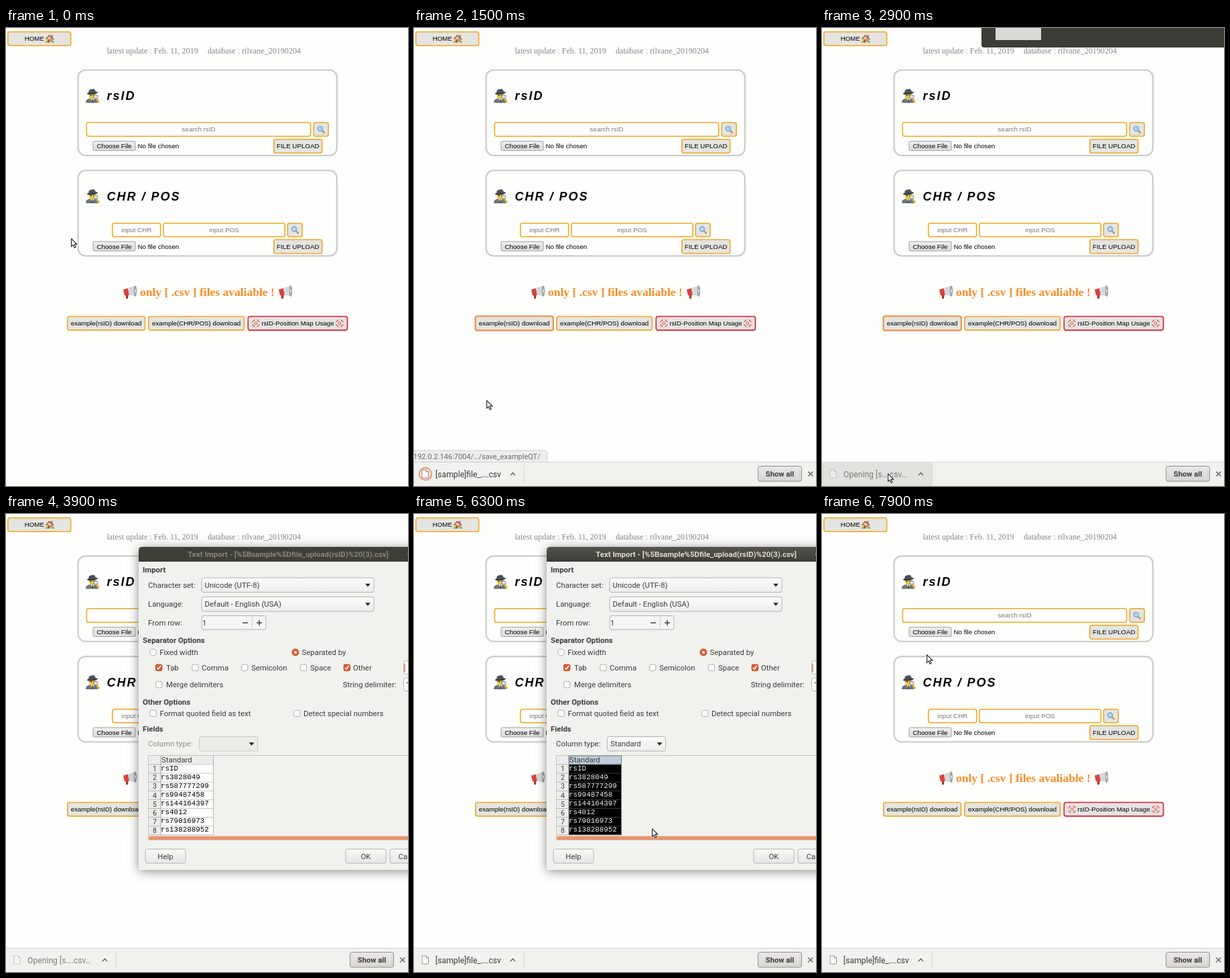
An HTML page with a canvas that plays this animation: 600 by 682 pixels, repeating every 8 s.

```html
<!DOCTYPE html>
<html lang="en">
<head>
<meta charset="utf-8">
<title>File download and text import</title>
<style>
html, body { margin: 0; width: 100%; height: 100%; overflow: hidden; background: #fefefd; }
canvas { display: block; }
</style>
</head>
<body>
<canvas id="stage" width="600" height="682"></canvas>
<script>
const LOOP = 8000, STEP = 100, TAU = Math.PI * 2;
const ORANGE = '#f5a623', FACE = '#e4e4e2', PANEL = '#f1f1ee', INK = '#3c3c3c';
const ARIAL = '9.75px "Liberation Sans", sans-serif';
const UI = '11.4px Roboto, sans-serif', UI_BOLD = 'bold ' + UI;
const MONO = '10.9px "Liberation Mono", monospace';

const main = document.getElementById('stage').getContext('2d');
const layer = document.createElement('canvas');
layer.width = 660;
layer.height = 682;
const layerCtx = layer.getContext('2d');
let g = main;

// ---- helpers ----
function text(s, x, y, font, color = '#000', align = 'left') {
  g.font = font;
  g.fillStyle = color;
  g.textAlign = align;
  g.fillText(s, x, y);
}

// Rounded box given by its outer edges.
function box(x0, y0, x1, y1, fill, stroke, line = 1, r = 3) {
  const h = stroke ? line / 2 : 0;
  g.beginPath();
  g.roundRect(x0 + h, y0 + h, x1 - x0 - 2 * h, y1 - y0 - 2 * h, r);
  if (fill) { g.fillStyle = fill; g.fill(); }
  if (stroke) { g.strokeStyle = stroke; g.lineWidth = line; g.stroke(); }
}

function rect(x, y, w, h, fill) {
  g.fillStyle = fill;
  g.fillRect(x, y, w, h);
}

function poly(points, fill) {
  g.beginPath();
  points.forEach(([x, y]) => g.lineTo(x, y));
  g.closePath();
  g.fillStyle = fill;
  g.fill();
}

function line(points, color, width = 1) {
  g.beginPath();
  points.forEach(([x, y], i) => i ? g.lineTo(x, y) : g.moveTo(x, y));
  g.strokeStyle = color;
  g.lineWidth = width;
  g.stroke();
}

function disc(x, y, rx, fill, stroke, width = 1, ry = rx) {
  g.beginPath();
  g.ellipse(x, y, rx, ry, 0, 0, TAU);
  if (fill) { g.fillStyle = fill; g.fill(); }
  if (stroke) { g.strokeStyle = stroke; g.lineWidth = width; g.stroke(); }
}

function shade(y0, y1, top, bottom) {
  const s = g.createLinearGradient(0, y0, 0, y1);
  s.addColorStop(0, top);
  s.addColorStop(1, bottom);
  return s;
}

function at(x, y, draw) {
  g.save();
  g.translate(x, y);
  draw();
  g.restore();
}

// ---- pictograms, centred on 0,0 ----
function house() {
  rect(-4.5, -1, 9, 6.5, '#e8b27a');
  rect(2, -5.5, 2, 4, '#a1543a');
  poly([[-6.5, 0], [-1, -6], [6.5, 0], [5, 1.5], [-1, -3.5], [-5.5, 1.5]], '#a86a45');
  rect(-3, 1.5, 2.6, 4, '#8d4a32');
  rect(1, 1, 2.5, 2.5, '#6d93b5');
  disc(-5, 4.6, 1.6, '#8fae4f');
  disc(5, 4.6, 1.5, '#8fae4f');
}

function detective() {
  poly([[-10.5, 10.5], [-9.5, 6], [-4, 3.5], [3, 3.5], [7, 6], [8, 10.5]], '#6c757b');
  poly([[-4, 3.5], [-0.5, 9], [3, 3.5]], '#e9e9e9');
  poly([[-1, 4.5], [-1.8, 10], [1, 10], [0, 4.5]], '#4a545b');
  disc(-0.5, -1, 5.4, '#f7c33c', null, 1, 6);
  rect(-3.6, -1.5, 1.8, 1.6, '#40322a');
  rect(1, -1.5, 1.8, 1.6, '#40322a');
  g.save();
  g.rotate(-0.12);
  disc(0, -4.2, 8.2, '#353d43', null, 1, 2.1);
  poly([[-5.8, -4.5], [-4.8, -9], [-1, -10.3], [3.5, -9.8], [5.8, -4.5]], '#4a545b');
  g.restore();
  line([[6, 4.5], [9.5, 9.5]], '#f0b52e', 3);
  disc(4.5, 1.5, 3, '#d5e6ea', '#7b868c', 1);
}

function glass() {
  line([[1, 1], [5, 5]], '#c9853f', 2.2);
  disc(-1.5, -1.5, 3.6, '#a9d8f2', '#6d9fc4', 1.2);
}

function megaphone() {
  poly([[-10, -4], [-3, -6], [-1, 4], [-8, 5]], '#d9433a');
  poly([[-6, 4], [-2.5, 3.5], [-3, 9.5], [-6, 9.5]], '#b8332e');
  poly([[-3, -6], [7.5, -10], [9.5, 6.5], [-1, 4]], '#d6d8d9');
  disc(8, -1.8, 2.2, '#9aa0a3', null, 1, 8.3);
  disc(8, -1.8, 1, '#e5e6e7', null, 1, 3);
}

function anger() {
  for (let i = 0; i < 4; i++) {
    g.rotate(Math.PI / 2);
    g.beginPath();
    g.moveTo(1.6, -5.6);
    g.quadraticCurveTo(3.2, -3.2, 5.6, -1.6);
    g.moveTo(-1.4, -1.8);
    g.quadraticCurveTo(0, -1.2, 1.4, -1.8);
    g.moveTo(3, -5.4);
    g.quadraticCurveTo(2.2, -2.2, 5.4, -3);
    g.strokeStyle = '#e2544c';
    g.lineWidth = 1;
    g.stroke();
  }
}

// ---- web page ----
function pageButton(x0, y0, x1, y1, label = '', border = ORANGE) {
  box(x0, y0, x1, y1, FACE, border, 1.6);
  text(label, (x0 + x1) / 2, (y0 + y1) / 2 + 3.3, ARIAL, '#000', 'center');
}

function pageInput(x0, y0, x1, y1, hint) {
  box(x0, y0, x1, y1, '#fff', ORANGE, 1.6);
  text(hint, (x0 + x1) / 2, (y0 + y1) / 2 + 3.2, ARIAL, '#757575', 'center');
}

function searchPanel(y, title) {
  box(106.5, y, 495, y + 129.5, null, '#cdcdcb', 2.3, 11);
  at(129.5, y + 39.5, detective);
  g.letterSpacing = '2px';
  text(title, 150.5, y + 45.5, 'italic bold 18px "Liberation Sans", sans-serif');
  g.letterSpacing = '0px';
  box(129.5, y + 106.5, 193.5, y + 121.5, shade(y + 106, y + 122, '#f0f0ee', '#dadad8'), '#a2a2a0', 1, 1.5);
  text('Choose File', 161.5, y + 117.5, ARIAL, '#000', 'center');
  text('No file chosen', 196.5, y + 117.5, ARIAL);
  pageButton(399, y + 103.5, 472.5, y + 125.5, 'FILE UPLOAD');
}

function page(focused) {
  rect(0, 0, 600, 682, '#fefefd');
  pageButton(2, 5, 97.5, 27);
  text('HOME', 27.7, 19.3, ARIAL);
  at(65.5, 16, house);
  const serif = '12.1px "Liberation Serif", serif';
  text('latest update : Feb. 11, 2019', 150.5, 38, serif, '#808886');
  text('database : rilvane_20190204', 301, 38, serif, '#808886');

  searchPanel(61.5, 'rsID');
  pageInput(119.5, 140, 455.5, 162, 'search rsID');
  pageButton(458.5, 140, 482, 162);
  at(470.5, 151.5, glass);

  searchPanel(211, 'CHR / POS');
  pageInput(158, 290, 231.5, 311.5, 'input CHR');
  pageInput(234, 290, 417, 311.5, 'input POS');
  pageButton(419.5, 290, 443, 311.5);
  at(431.5, 301, glass);

  at(185, 393.5, megaphone);
  text('only [ .csv ] files avaliable !', 200, 399.3, 'bold 17.5px "Liberation Serif", serif', '#fb8b24');
  at(417, 393.5, megaphone);

  pageButton(91, 428.7, 208.3, 450.7, 'example(rsID) download');
  if (focused) box(90.3, 428, 209, 451.4, null, '#f0965c', 2);
  pageButton(212, 428.7, 356.3, 450.7, 'example(CHR/POS) download');
  pageButton(360.5, 428.7, 510.3, 450.7, 'rsID-Position Map Usage', '#dc1a2c');
  at(373, 439.7, anger);
  at(498, 439.7, anger);
}

// ---- browser chrome ----
function statusBubble(bottom) {
  g.beginPath();
  g.roundRect(-2, bottom - 17, 200.5, 20, [0, 4, 0, 0]);
  g.fillStyle = '#ededeb';
  g.fill();
  g.strokeStyle = '#cfcfcc';
  g.lineWidth = 1;
  g.stroke();
  text('192.0.2.146:7004/…/save_exampleQT/', -1, bottom - 4, '11px Roboto, sans-serif', '#6a6a68');
}

function downloadBar(top, { opening, hover, ring }) {
  g.save();
  g.translate(0, top - 646);
  rect(0, 646, 600, 36, PANEL);
  if (hover) rect(0, 647, 164, 35, '#e1e1de');
  rect(0, 646, 600, 1, '#d3d3d0');
  rect(164, 651, 1, 27, '#d3d3d0');

  if (ring) disc(17, 664, 9.3, '#f8dfd5', '#e9835f', 1.5);
  g.globalAlpha = opening ? 0.4 : 1;
  poly([[12, 658], [18.5, 658], [21.5, 661], [21.5, 670], [12, 670]], '#fbfbfa');
  line([[12, 658], [18.5, 658], [21.5, 661], [21.5, 670], [12, 670], [12, 657.5]], '#94928e');
  line([[18.5, 658], [18.5, 661], [21.5, 661]], '#94928e');
  g.globalAlpha = 1;
  text(opening ? 'Opening [s….csv…' : '[sample]file_….csv', 32, 668.8,
    '12.2px Roboto, sans-serif', opening ? '#7d7d7a' : INK);
  line([[144, 666], [147.5, 662.5], [151, 666]], '#555', 1.3);

  box(513, 652, 579, 675.5, shade(652, 675, '#e9e8e6', '#d6d5d2'), '#93918e', 1, 3);
  text('Show all', 546, 667.7, 'bold 11.2px Roboto, sans-serif', INK, 'center');
  line([[588.5, 660.5], [595.5, 667.5]], '#666', 1.5);
  line([[595.5, 660.5], [588.5, 667.5]], '#666', 1.5);
  g.restore();
}

function splash() {
  box(238, -10, 610, 29, '#3d3c37', null, 0, 4);
  rect(259, 0, 68, 18, '#d9dbd9');
}

// ---- import dialog ----
function combo(x0, y0, x1, y1, label, enabled = true) {
  box(x0, y0, x1, y1, enabled ? shade(y0, y1, '#fcfcfb', '#ececea') : '#ebebe8', enabled ? '#b3b2ae' : '#c9c8c4');
  text(label, x0 + 5, (y0 + y1) / 2 + 4, UI, INK);
  const x = x1 - 9.5, y = (y0 + y1) / 2;
  poly([[x - 4, y - 2], [x + 4, y - 2], [x, y + 2.5]], '#222');
}

function mark(x, y, label, labelX, checked) {
  box(x, y - 5.2, x + 10.4, y + 5.2, checked ? '#df5b33' : '#fbfbfa', checked ? '#b9481f' : '#b0afab', 1, 2);
  if (checked) line([[x + 2.5, y], [x + 4.5, y + 2.5], [x + 8, y - 3]], '#fff', 1.6);
  text(label, labelX, y + 4, UI, INK);
}

function radio(x, y, label, on) {
  disc(x, y, 5, on ? '#df5b33' : '#fbfbfa', on ? '#b9481f' : '#b0afab');
  if (on) disc(x, y, 2, '#fff');
  text(label, x + 9.5, y + 4, UI, INK);
}

function dialogButton(x, label) {
  box(x, 498.5, x + 61, 520.5, shade(498, 521, '#fafaf9', '#e6e6e3'), '#b3b2ae');
  text(label, x + 30.5, 513.7, UI, INK, 'center');
}

function table(selected) {
  const rows = ['rsID', 'rs3828049', 'rs587777299', 'rs99487458', 'rs144164397', 'rs4012', 'rs79016973', 'rs138288952'];
  const top = 373, pitch = 13.1, end = top + pitch * rows.length;
  line([[700, 359.5], [212.5, 359.5], [212.5, 485.5], [700, 485.5]], '#c4c3bf');
  rect(213, 360, 18, end - 360, '#ececea');
  rect(231, 360, 79, 13, selected ? '#bfcddd' : '#ececea');
  rect(231, top, 79, end - top, selected ? '#000' : '#fff');
  text('Standard', 232, 370.3, UI, INK);
  rows.forEach((row, i) => {
    const y = top + i * pitch;
    line([[213, y], [231, y]], '#b5b4b0');
    line([[231, y], [310, y]], selected ? '#3a3a3a' : '#c8c8c5');
    text(i + 1, 222, y + 10.2, '10.5px Roboto, sans-serif', INK, 'center');
    text(row, 231, y + 8.6, MONO, selected ? '#f0f0f0' : '#000');
  });
  line([[213, end], [310, end]], '#b5b4b0');
  line([[231, 360], [231, end]], '#a5a4a0');
  line([[309.5, 360], [309.5, end]], '#b5b4b0');
  if (selected) {
    g.setLineDash([1.5, 1.5]);
    line([[231.5, end], [231.5, 360], [309.5, 360], [309.5, end], [231.5, end]], '#333');
    line([[231, top], [310, top]], '#aaa');
    g.setLineDash([]);
  }
  rect(213.5, 479.7, 430, 5.3, '#e99468');
}

function dialogContent(active, selected) {
  g.beginPath();
  g.roundRect(198, 49, 446, 481, [5, 5, 1, 1]);
  g.fillStyle = PANEL;
  g.fill();
  g.beginPath();
  g.roundRect(198, 49, 446, 22, [5, 5, 0, 0]);
  g.fillStyle = active ? shade(49, 71, '#55534d', '#3d3c37') : '#3f3e39';
  g.fill();
  text('Text Import - [%5Bsample%5Dfile_upload(rsID)%20(3).csv]', 421, 64, UI_BOLD,
    active ? '#dfdbd2' : '#8a867e', 'center');
  disc(604, 60, 6, active ? '#8b877f' : '#5d5a54', '#33322e');
  line([[601, 60], [607, 60]], '#3c3b37', 1.3);

  [['Import', 83], ['Separator Options', 188], ['Other Options', 279.5], ['Fields', 320]]
    .forEach(([s, y]) => text(s, 204, y + 4, UI_BOLD, INK));

  text('Character set:', 212, 110, UI, INK);
  combo(291.5, 94.5, 549.5, 117, 'Unicode (UTF-8)');
  text('Language:', 212, 138, UI, INK);
  combo(291.5, 123, 549.5, 145.5, 'Default - English (USA)');
  text('From row:', 212, 166, UI, INK);
  box(291.5, 151, 388.5, 172.5, '#f5f5f3', '#b3b2ae');
  rect(367, 152, 1, 20, '#d0cfcb');
  text('1', 293, 166, UI, INK);
  line([[353, 162], [361, 162]], INK, 1.5);
  line([[374, 162], [382, 162]], INK, 1.5);
  line([[378, 158], [378, 166]], INK, 1.5);

  radio(219.7, 206, 'Fixed width', false);
  radio(432, 206, 'Separated by', true);
  mark(223, 228.7, 'Tab', 239, true);
  mark(277.3, 228.7, 'Comma', 292, false);
  mark(351, 228.7, 'Semicolon', 366, false);
  mark(438.7, 228.7, 'Space', 454, false);
  mark(503.7, 228.7, 'Other', 518, true);
  box(593, 218.5, 634, 238.5, '#fff', '#b3b2ae');
  rect(594.5, 223, 1.3, 12, '#d9662f');
  mark(223, 254, 'Merge delimiters', 239, false);
  text('String delimiter:', 582.5, 258, UI, INK, 'right');
  box(593, 243.5, 634, 264, '#fff', '#b3b2ae');
  text('"', 597.5, 258, UI, INK);

  mark(214.5, 297, 'Format quoted field as text', 229.5, false);
  mark(429, 297, 'Detect special numbers', 444, false);

  text('Column type:', 212, 346, UI, selected ? INK : '#8f8f8c');
  combo(288, 331, 376, 353.5, selected ? 'Standard' : '', selected);
  table(selected);
  dialogButton(207.5, 'Help');
  dialogButton(506.5, 'OK');
  dialogButton(572.5, 'Cancel');
}

function dialog(t) {
  const p = Math.max(0, (t - 7350) / 400);
  if (t < 3900 || p >= 1) return;
  g = layerCtx;
  g.clearRect(0, 0, 660, 682);
  dialogContent(t >= 4000, t >= 5100);
  g = main;

  const cx = 422, cy = 289.5, scale = 1 - 0.177 * p, alpha = 1 - p ** 1.3;
  g.save();
  g.translate(cx, cy);
  g.scale(scale, scale);
  g.translate(-cx, -cy);
  g.globalAlpha = 0.45 * alpha ** 3;
  g.shadowColor = '#000';
  g.shadowBlur = 16;
  g.shadowOffsetY = 2;
  box(198, 49, 644, 530, '#000', null, 0, 5);
  g.shadowColor = 'transparent';
  g.globalAlpha = alpha;
  g.drawImage(layer, 0, 0);
  g.restore();
}

// ---- pointer: time, x, y; it leaves the stage on the right twice ----
const PATH = [
  [0, 97, 313], [500, 170, 440], [900, 197, 435], [1000, 197, 435], [1500, 108, 554],
  [1800, 100, 661], [2000, 98, 663], [2900, 98, 663], [3600, 575, 361], [3700, 620, 365],
  [4200, 620, 400], [4300, 460, 393], [4800, 269, 359], [5100, 269, 359], [5900, 268, 445],
  [6000, 268, 445], [6300, 355, 468], [6600, 355, 468], [6800, 501, 514], [6900, 620, 512],
  [7500, 620, 480], [7900, 156, 209]
];

function pointer(t) {
  const i = Math.max(1, PATH.findIndex(k => k[0] >= t));
  const [t0, x0, y0] = PATH[i - 1], [t1, x1, y1] = PATH[i];
  const k = (t - t0) / (t1 - t0);
  at(x0 + (x1 - x0) * k, y0 + (y1 - y0) * k, () => {
    const shape = [[0.6, 0.6], [0.6, 12.3], [3.2, 9.9], [5.1, 14.2], [7.1, 13.3], [5.2, 9.1], [8.8, 9], [0.6, 0.6]];
    line(shape, 'rgba(255,255,255,.7)', 2.4);
    poly(shape, '#fff');
    line(shape, '#1c1c1c', 1.1);
  });
}

function draw(t) {
  page(t >= 500 && t < 3900);
  const barTop = t < 600 ? 682 : 646 + Math.max(0, 800 - t) / 200 * 24;
  if (t >= 300 && t < 1900) statusBubble(barTop);
  if (t >= 600) {
    downloadBar(barTop, {
      opening: t >= 2300 && t < 5500,
      hover: t >= 1800 && t < 3000,
      ring: t >= 800 && t < 2000
    });
  }
  if (t >= 2800 && t < 3900) splash();
  dialog(t);
  pointer(t);
}

const start = performance.now();
function frame() {
  const t = (performance.now() - start) % LOOP;
  draw(Math.floor(t / STEP) * STEP);
  requestAnimationFrame(frame);
}
frame();
</script>
</body>
</html>
```
